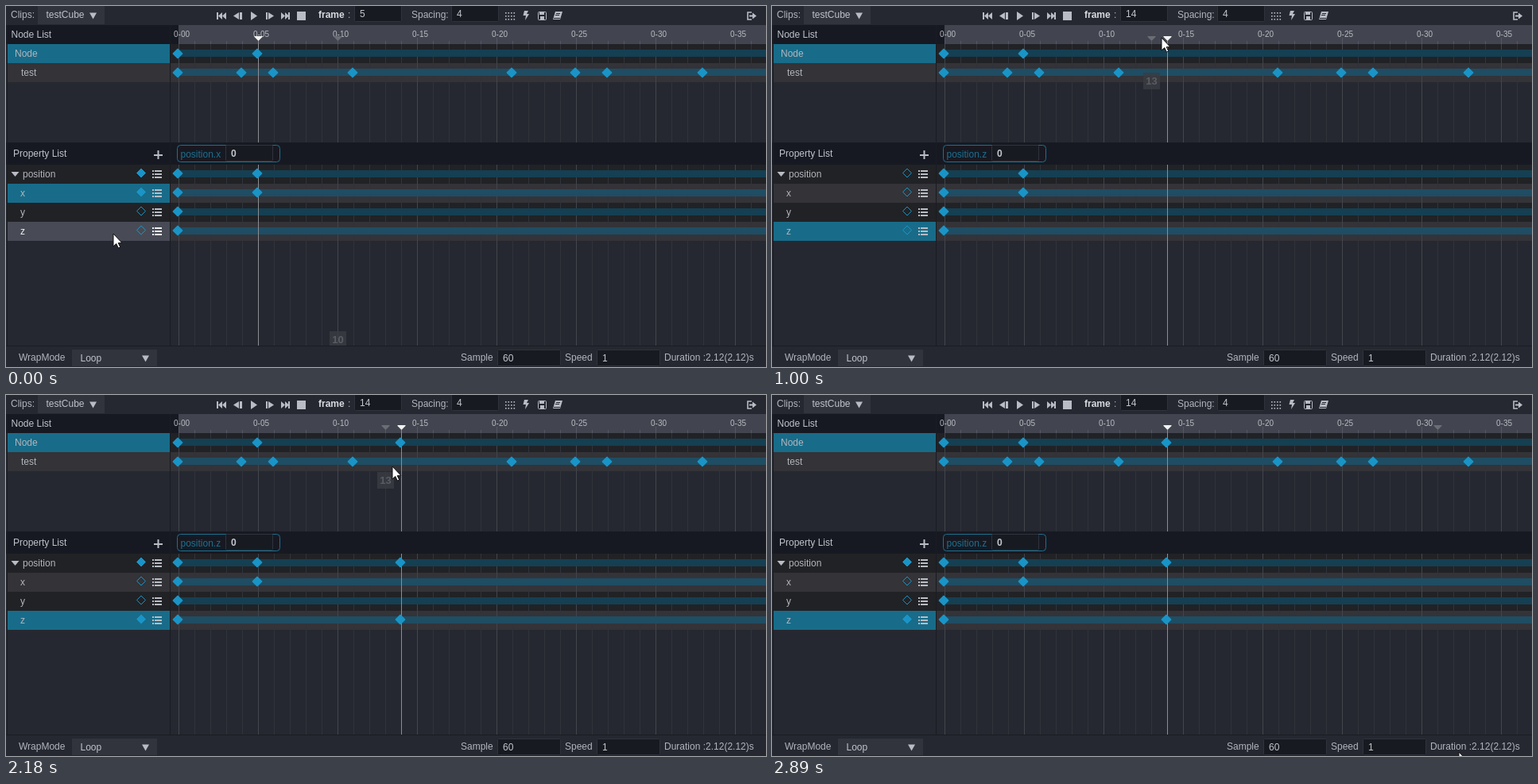
An HTML page with a canvas that plays this animation: 956 px wide and 455 px high, repeating every 2.96 s.

```html
<!DOCTYPE html>
<html lang="en">
<head>
<meta charset="utf-8">
<title>Animation timeline</title>
<style>
  html, body { margin: 0; width: 100%; height: 100%; overflow: hidden; background: #252830; }
  canvas { display: block; }
</style>
</head>
<body>
<canvas id="stage" width="956" height="455"></canvas>
<script>
const ctx = document.getElementById('stage').getContext('2d');
const LOOP = 2960, WIDTH = 956;
const BLUE = '#1a94c6', SELECTED = '#186c89', HEADER = '#171922', LINE = '#1a1c23';
const TEXT = '#b2b5bd', ICON = '#b9bcc4', BACK = '#252830';

// Pointer samples: time, x, y. Each one holds until the next.
const PATH = [
  [0, 135, 287], [80, 132, 283], [160, 130, 279],
  [390, 168, 252], [460, 300, 170], [540, 484, 86], [620, 489, 70], [700, 490, 60], [770, 490, 48],
  [850, 490, 42], [930, 490, 40], [1160, 491, 60], [1240, 493, 72], [1320, 494, 73], [1400, 490, 73],
  [2180, 486, 90], [2260, 476, 112], [2330, 465, 139], [2410, 551, 263], [2490, 630, 318],
  [2560, 722, 350], [2640, 790, 388], [2720, 826, 412], [2800, 850, 436], [2890, 864, 450]
];

const frameX = frame => 217 + frame * 20;

function rect(x, y, w, h, color) {
  ctx.fillStyle = color;
  ctx.fillRect(x, y, w, h);
}

function text(str, x, y, color = TEXT, font = '12px', align = 'left') {
  ctx.font = font + ' "Liberation Sans", Arial, sans-serif';
  ctx.textAlign = align;
  ctx.fillStyle = color;
  ctx.fillText(str, x, y);
}

function poly(color, ...points) {
  ctx.fillStyle = color;
  ctx.beginPath();
  for (let i = 0; i < points.length; i += 2) ctx.lineTo(points[i], points[i + 1]);
  ctx.closePath();
  ctx.fill();
}

function outline(color, width = 1) {
  ctx.strokeStyle = color;
  ctx.lineWidth = width;
  ctx.stroke();
}

function roundBox(x, y, w, h, radius, fill, stroke) {
  ctx.beginPath();
  ctx.roundRect(x + .5, y + .5, w - 1, h - 1, radius);
  ctx.fillStyle = fill;
  ctx.fill();
  if (stroke) outline(stroke);
}

function input(x, y, w, value, font) {
  roundBox(x, y, w, 21, 1, '#181a21', '#30333c');
  text(value, x + 7, y + 15, '#c3c6cd', font);
}

function dropdown(x, y, w, h, value) {
  rect(x, y, w, h, '#31343d');
  text(value, x + 10.5, y + 15, '#c0c3ca');
  const ax = x + w - 19, ay = y + h / 2 - 3;
  poly(ICON, ax, ay, ax + 9, ay, ax + 4.5, ay + 8);
}

function keyframe(x, y) {
  ctx.save();
  ctx.translate(x, y);
  ctx.rotate(Math.PI / 4);
  ctx.beginPath();
  ctx.roundRect(-4.8, -4.8, 9.6, 9.6, 1);
  ctx.fillStyle = BLUE;
  ctx.fill();
  ctx.restore();
}

function keyToggle(y, filled) {
  poly(filled ? BLUE : 'transparent', 170, y - 5.5, 175.5, y, 170, y + 5.5, 164.5, y);
  outline(BLUE);
}

function listIcon(y, color) {
  for (let i = -1; i < 2; i++) {
    rect(184, y + i * 4 - 1, 2, 2, color);
    rect(187, y + i * 4 - 1, 9, 2, color);
  }
}

function toolbar(playhead) {
  text('Clips:', 6, 15);
  dropdown(40, 0, 84, 23, 'testCube');

  const tri = (x, w) => poly(ICON, x, 8, x + w, 12.5, x, 17);
  rect(265, 8, 2, 9, ICON); tri(272, -5); tri(277, -5);
  tri(293, -7); rect(294, 8, 3, 9, ICON);
  poly(ICON, 308, 7, 316, 12.5, 308, 18);
  rect(327, 8, 2, 9, ICON); tri(330, 7);
  tri(346, 5); tri(351, 5); rect(355, 8, 2, 9, ICON);
  rect(366, 7, 11, 11, ICON);

  text('frame', 393, 15, '#d9dbe0', 'bold 12px');
  text(':', 430, 15);
  input(438, -1, 60, playhead);
  text('Spacing:', 510, 15);
  input(560, -1, 60, '4');

  for (let i = 0; i < 12; i++) rect(628 + i % 4 * 3.5, 8 + (i >> 2) * 4, 1.6, 1.6, ICON);
  poly(ICON, 652, 6, 657, 6, 655, 10, 658, 10, 653, 18, 654, 12, 650.5, 12);

  roundBox(669, 7, 11, 11, 1, 'transparent', ICON);
  rect(671, 8, 6, 3, ICON);
  rect(672, 13, 5, 5, ICON);

  poly(ICON, 691, 7, 700, 7, 697, 17, 688, 17);
  rect(692, 9, 5, 1, BACK);
  rect(691, 11, 5, 1, BACK);
  rect(689, 15, 8, 1, BACK);

  ctx.beginPath();
  ctx.moveTo(938, 8); ctx.lineTo(933, 8); ctx.lineTo(933, 17); ctx.lineTo(938, 17);
  outline(ICON, 1.6);
  rect(935, 11.5, 5, 2, ICON);
  poly(ICON, 939, 8.5, 944, 12.5, 939, 16.5);
}

function ruler() {
  rect(0, 24, WIDTH, 24, HEADER);
  text('Node List', 6.5, 40, '#c0c3ca');
  rect(217, 24, 739, 24, '#42454f');
  for (let frame = 0; frame < 37; frame++) {
    const major = frame % 5 === 0;
    rect(frameX(frame), major ? 40 : 44, 1, major ? 8 : 4, '#555862');
    if (major) text('0-' + String(frame).padStart(2, '0'), frameX(frame) - 6, 39, '#b8bac1', '10px');
  }
}

function grid(top, bottom) {
  for (let frame = 0; frame < 37; frame++)
    rect(frameX(frame), top, 1, bottom - top, frame % 5 ? '#30333a' : '#42454c');
}

function trackRow({ top, light }) {
  rect(207, top, 749, 24, light ? '#333338' : '#212225');
}

function bar({ top, light, glow }) {
  rect(216, top + 7, 740, 9, light ? '#1f4d63' : '#153f52');
  if (glow) rect(glow[0], top + 7, glow[1] - glow[0], 9, '#6c6c73');
}

function label({ name, top, light, indent, selected, hovered, property }, playhead, keys) {
  const bright = hovered && !selected;
  rect(2, top, 204, 24, selected ? SELECTED : hovered ? '#484b55' : light ? '#333338' : '#212225');
  text(name, indent, top + 16, bright ? '#eef0f3' : TEXT);
  if (!property) return;
  keyToggle(top + 10.5, keys.includes(playhead));
  listIcon(top + 12, bright ? '#eef0f3' : ICON);
}

function marker(frame, color) {
  const x = frameX(frame) + .5;
  poly(color, x - 5, 38, x + 5, 38, x + 5, 39, x, 44, x - 5, 39);
}

function footer() {
  rect(0, 429, WIDTH, 26, BACK);
  rect(0, 428, WIDTH, 1, LINE);
  text('WrapMode', 16, 447);
  dropdown(83, 433, 107, 21, 'Loop');
  text('Sample', 572, 447);
  input(618, 433, 80, '60');
  text('Speed', 703, 447);
  input(743, 433, 80, '1');
  text('Duration :2.12(2.12)s', 828, 447);
}

function pointer(x, y) {
  const shape = [0, 0, 0, 16, 3.7, 12.6, 6.4, 18, 8.8, 17, 6.2, 11.7, 11, 11.7];
  poly('#fff', ...shape.map((v, i) => v + (i % 2 ? y : x)));
  outline('#111');
}

// The hover hint trails the pointer by one sample and stays put outside the tracks.
function pointerState(t) {
  let hint = { frame: 10, y: 386 }, index = 0;
  while (index + 1 < PATH.length && PATH[index + 1][0] <= t) {
    const [, x, y] = PATH[index++];
    if (x > 217 && y > 48) hint = { frame: Math.floor((x - 217) / 20), y };
  }
  return { x: PATH[index][1], y: PATH[index][2], hint };
}

function draw(t) {
  const { x, y, hint } = pointerState(t);
  const playhead = t < 1000 ? 5 : 14;
  const axis = t < 310 ? 'x' : 'z';
  const added = t >= 1930 ? [14] : [];
  const within = (from, to) => t >= from && t < to;

  const rows = [
    { name: 'Node', top: 48, indent: 11, keys: [0, 5, ...added], selected: true },
    { name: 'test', top: 72, indent: 19, keys: [0, 4, 6, 11, 21, 25, 27, 33], light: true,
      glow: within(620, 700) && [436, 636] },
    { name: 'position', top: 200, indent: 21, keys: [0, 5, ...added], property: true },
    { name: 'x', top: 224, indent: 18, keys: [0, 5], light: true, property: true },
    { name: 'y', top: 248, indent: 18, keys: [0], property: true, glow: within(2490, 2560) && [216, WIDTH] },
    { name: 'z', top: 272, indent: 18, keys: [0, ...added], light: true, property: true }
  ];
  for (const row of rows) {
    if (row.name === axis) row.selected = true;
    row.hovered = row.property && x < 206 && y >= row.top && y < row.top + 24;
    // The pressed row keeps its hover shade until the pointer leaves.
    if (row.hovered) row.selected = false;
  }

  rect(0, 0, WIDTH, 455, BACK);
  toolbar(playhead);
  ruler();
  rows.forEach(trackRow);
  grid(48, 172);
  grid(200, 428);
  rows.forEach(bar);

  rect(0, 172, WIDTH, 28, HEADER);
  text('Property List', 9, 190, '#c0c3ca');
  rect(186, 187, 11, 2, ICON);
  rect(190.5, 182, 2, 11, ICON);
  roundBox(215, 175, 130, 22, 4, HEADER, '#1b7190');
  text('position.' + axis, 219.5, 191, '#1b7190');
  input(276, 175, 60, '0', 'bold 12px');

  marker(hint.frame, '#6b6d75');
  marker(playhead, '#f2f2f3');
  rect(frameX(playhead), 44, 1, 128, '#8b8d92');
  rect(frameX(playhead), 200, 1, 228, '#8b8d92');
  for (const row of rows) {
    label(row, playhead, row.keys);
    for (const key of row.keys) keyframe(frameX(key) - 1, row.top + (row.property ? 11 : 12));
  }
  poly(ICON, 6.5, 209, 16.5, 209, 11.5, 215);
  rect(206, 24, 1, 404, LINE);
  rect(1, 24, 1, 431, LINE);

  const hx = frameX(hint.frame);
  rect(hx - 10, hint.y + 24, 21, 21, 'rgba(58,60,66,.8)');
  text(hint.frame, hx + .5, hint.y + 39, '#5b5d64', 'bold 13px', 'center');
  footer();

  if (within(1860, 1930)) {
    rect(461, 388, 34, 67, '#000');
    ctx.font = 'bold 40px "Open Sans", sans-serif';
    ctx.fillStyle = '#fff';
    ctx.textAlign = 'center';
    ctx.fillText('i', 478, 444);
  }
  pointer(x, y);
}

const start = performance.now();
function tick() {
  draw((performance.now() - start) % LOOP);
  requestAnimationFrame(tick);
}
tick();
</script>
</body>
</html>
```
